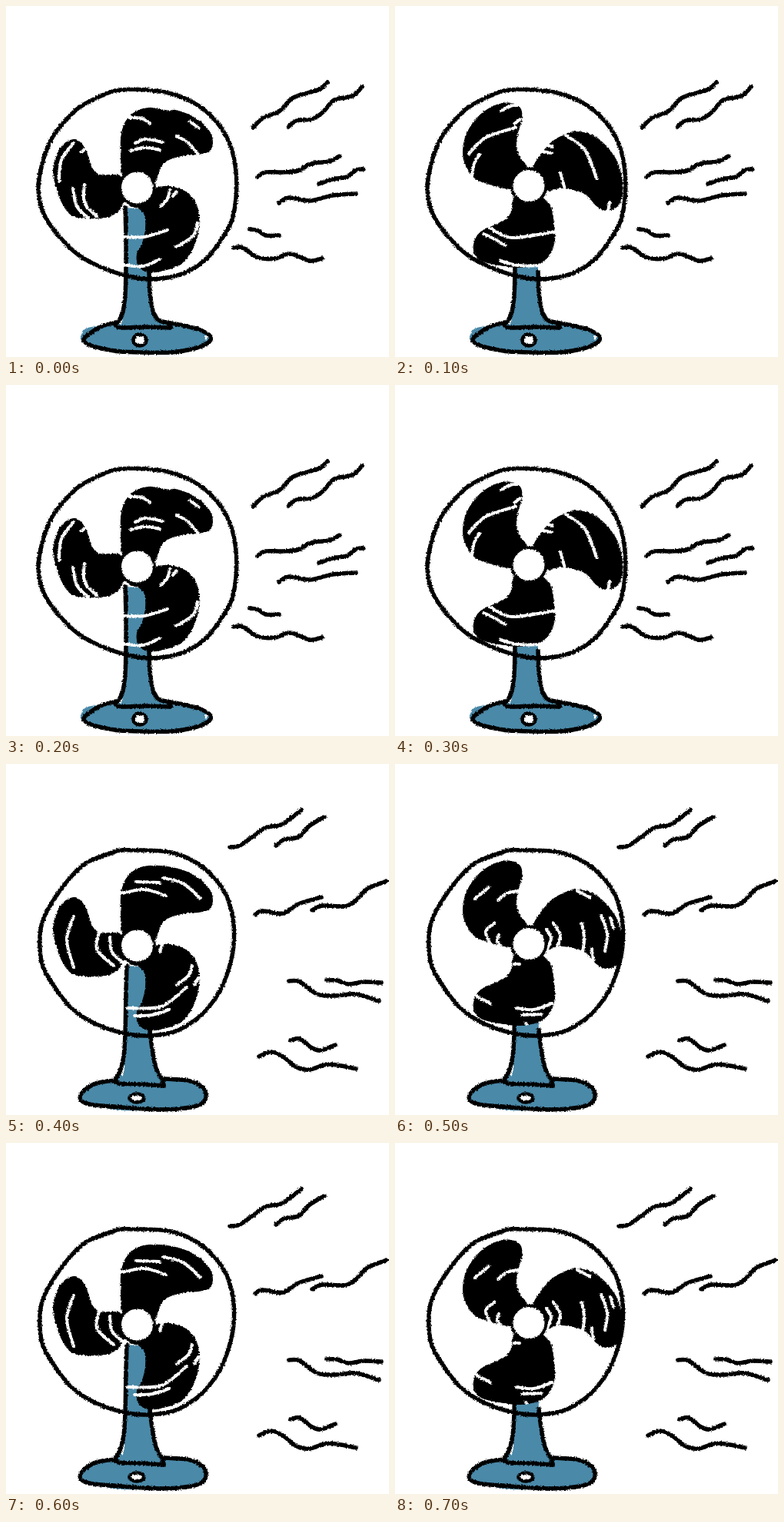
These frames come from a looping animation (498 by 456 pixels, 800 ms). An HTML page:

```html
<!DOCTYPE html>
<html lang="en">
<head>
<meta charset="utf-8">
<title>Desk fan</title>
<style>
  html, body { margin: 0; width: 100%; height: 100%; overflow: hidden; background: #fff; }
  svg { display: block; width: 100vw; height: 100vh; }
</style>
</head>
<body>
<svg id="stage" viewBox="0 0 498 456" xmlns="http://www.w3.org/2000/svg">
  <filter id="rough" filterUnits="userSpaceOnUse" x="0" y="0" width="498" height="456" color-interpolation-filters="sRGB">
    <feTurbulence type="fractalNoise" baseFrequency="0.45" numOctaves="2" seed="4" result="n"/>
    <feDisplacementMap in="SourceGraphic" in2="n" scale="3.5" xChannelSelector="R" yChannelSelector="G"/>
  </filter>
  <g id="art" filter="url(#rough)" stroke-linecap="round" stroke-linejoin="round"></g>
</svg>
<script>
const BLUE = '#4a89a8';
const STEP = 100, STEPS = 8;

// Two drawings of the stand, cage and breeze
const bodies = [
  {
    column: '155,262 156,300 156,340 155,375 152,397 147,409 142,414 150,418 180,418 214,418 211,412 198,408 191,396 187,370 186,345 184,264',
    left: '155,262 156,300 156,340 155,375 152,397 147,409 142,414 150,418 180,417 214,418',
    right: '186,345 187,370 191,396 198,408 211,412 214,418',
    baseFill: '97,430 104,419 125,415 143,411 180,414 214,412 240,417 260,424 264,431 258,440 240,446 215,450 180,451 150,450 120,445 102,438',
    base: '143,411 125,416 108,426 101,434 108,440 125,445 150,449 180,450 215,450 245,445 262,438 266,430 255,422 235,416 214,412',
    knob: [174, 434, 8.5, 7.5],
    specks: ['261,428 260,432', '150,408 149,412'],
    ring: '182,109 215,114 248,128 275,152 292,182 299,215 299,250 293,280 279,305 262,327 240,343 215,352 185,355 155,350 125,340 95,324 68,298 49,270 42,238 47,205 58,175 72,155 95,132 130,114 150,109',
    wind: [
      '321,158 335,145 355,137 372,120 392,113 408,108 418,99',
      '367,157 378,149 398,147 412,138 427,122 450,117 463,105',
      '327,222 337,216 360,216 380,214 397,205 420,202 434,195',
      '407,231 425,225 443,222 455,213 465,212',
      '355,256 368,249 395,253 425,246 455,244',
      '317,290 328,292 338,298 355,298',
      '296,314 308,314 328,327 350,328 370,322 395,331 411,328'
    ]
  },
  {
    column: '157,262 156,300 155,350 152,380 148,400 143,414 175,416 205,418 203,410 195,395 190,370 187,345 184,264',
    left: '157,262 156,300 155,350 153,380 148,400 143,414 175,416 205,418',
    right: '187,345 190,370 195,395 203,410 205,418',
    baseFill: '97,434 103,422 120,414 143,412 175,414 205,410 235,412 252,418 259,428 256,440 240,446 200,449 150,450 115,443',
    base: '143,411 120,414 103,423 96,434 102,440 115,443 150,446 200,449 240,446 256,440 260,428 252,417 235,411 205,409',
    knob: [170, 434, 9.5, 5.5],
    specks: ['153,392 151,403'],
    ring: '175,112 210,114 240,124 265,142 285,168 295,200 296,235 290,265 278,295 258,322 238,338 215,349 180,353 150,349 115,337 85,317 62,288 47,260 44,225 49,200 65,172 85,146 105,128 135,116 150,112',
    wind: [
      '291,108 304,106 320,95 337,83 358,79 372,69 384,60',
      '351,106 362,98 380,95 395,80 414,69',
      '324,196 333,191 360,194 380,182 410,173',
      '398,190 412,184 440,185 455,177 470,162 495,152',
      '368,282 382,283 405,299 430,301 455,299 485,308',
      '417,281 430,281 445,286 465,283 488,284',
      '329,380 345,374 360,380 378,394 395,397 420,390 455,396',
      '370,359 382,357 398,369 410,372 428,365'
    ]
  }
];

// Two blade poses
const rotors = [
  {
    hub: [170.5, 236],
    blades: [
      '170,236 152,222 149,190 150,165 158,146 175,134 200,132 228,137 250,148 265,163 269,178 264,189 250,193 228,195 210,201 201,210 197,222 190,234',
      '165,236 150,221 138,219 122,219 112,210 106,192 98,178 88,173 74,180 65,196 61,215 65,235 72,255 85,272 105,276 130,275 145,268 152,258',
      '172,240 193,236 212,234 232,240 246,254 251,272 250,295 242,318 228,335 205,344 185,346 172,338 170,322 177,308 181,290 180,272 172,263 160,258'
    ]
  },
  {
    hub: [174, 233.5],
    blades: [
      '170,236 150,238 130,234 105,225 92,208 88,190 92,168 104,148 120,134 140,126 155,127 164,134 165,148 160,165 158,182 163,197 172,210',
      '176,230 180,208 190,192 203,177 220,167 236,163 258,168 275,182 288,200 295,222 296,245 290,260 275,266 262,260 250,247 236,240 215,237 197,240',
      '172,236 154,250 152,265 145,276 130,284 113,292 104,303 102,318 110,330 130,336 160,340 185,336 200,325 208,305 207,285 205,270 200,256'
    ]
  }
];

// White glints, by body then rotor
const glints = [
  [
    ['160,145 176,146 187,152', '162,188 180,184 200,187', '168,178 182,173 204,177', '239,150 250,158',
     '222,169 237,178 249,192', '195,131 214,134', '88,178 72,200 69,228', '98,190 106,183', '87,237 92,260 107,276',
     '102,232 101,250 106,263', '109,265 118,273', '201,261 210,250 213,239', '217,247 222,241',
     '249,282 243,299 221,313', '153,300 180,300 210,291', '152,336 178,338 200,329'],
    ['138,136 150,130 162,129', '96,192 118,171 157,158', '110,193 103,205 100,221', '155,153 163,147',
     '187,188 203,191', '194,180 205,183', '222,168 247,187 262,224', '215,217 221,238', '277,266 279,255',
     '123,288 152,301 208,293', '115,296 128,302 143,311', '137,331 160,337 190,337']
  ],
  [
    ['169,153 200,154', '150,168 180,163 208,171', '204,148 230,155 252,174', '88,198 79,228 88,264',
     '123,213 118,240 140,262', '135,225 138,245 155,260', '204,232 200,244', '242,262 237,275 222,287',
     '250,278 245,287', '158,317 202,315 235,290', '167,327 190,326 212,319'],
    ['104,175 122,160', '134,177 145,168 160,165', '130,207 118,217 124,234', '135,222 133,230 138,238',
     '237,165 253,173', '243,207 246,228 243,250', '268,197 276,220 273,243', '280,200 284,213', '256,240 258,255',
     '197,215 203,226 198,240', '206,207 215,222 211,237', '103,300 124,311', '158,317 180,319 204,311',
     '165,326 190,325', '155,260 162,260', '170,337 171,338']
  ]
];

const art = document.getElementById('art');

function add(parent, tag, attrs = {}) {
  const el = document.createElementNS('http://www.w3.org/2000/svg', tag);
  for (const k in attrs) el.setAttribute(k, attrs[k]);
  parent.appendChild(el);
  return el;
}

// Smooth curve through the given points
function curve(text, closed) {
  const p = text.split(' ').map(s => s.split(',').map(Number));
  const n = p.length;
  const at = i => closed ? p[(i + n) % n] : p[Math.max(0, Math.min(n - 1, i))];
  let d = 'M' + p[0];
  for (let i = 0; i < (closed ? n : n - 1); i++) {
    const [a, b, c, e] = [at(i - 1), at(i), at(i + 1), at(i + 2)];
    const c1 = b.map((v, k) => v + (c[k] - a[k]) / 6);
    const c2 = c.map((v, k) => v - (e[k] - b[k]) / 6);
    d += `C${c1} ${c2} ${c}`;
  }
  return closed ? d + 'Z' : d;
}

const line = (g, pts, width, color = '#000', closed = false) =>
  add(g, 'path', { d: curve(pts, closed), fill: 'none', stroke: color, 'stroke-width': width });
const blob = (g, pts, color) => add(g, 'path', { d: curve(pts, true), fill: color });

function drawBody(b) {
  const g = add(art, 'g');
  blob(g, b.baseFill, BLUE);
  add(g, 'polygon', { points: b.column, fill: BLUE });
  b.specks.forEach(s => line(g, s, 3, '#fff'));
  line(g, b.base, 5.5);
  line(g, b.left, 5.5);
  line(g, b.right, 5.5);
  const [cx, cy, rx, ry] = b.knob;
  add(g, 'ellipse', { cx, cy, rx, ry, fill: '#fff', stroke: '#000', 'stroke-width': 4.5 });
  line(g, b.ring, 5.5, '#000', true);
  b.wind.forEach(w => line(g, w, 5.5));
  return g;
}

function drawRotor(r) {
  const g = add(art, 'g');
  r.blades.forEach(s => blob(g, s, '#000'));
  return g;
}

function drawGlints(list, hub) {
  const g = add(art, 'g');
  list.forEach(s => line(g, s, 4, '#fff'));
  add(g, 'circle', { cx: hub[0], cy: hub[1], r: 22.5, fill: '#fff', stroke: '#000', 'stroke-width': 4 });
  return g;
}

const bodyEls = bodies.map(drawBody);
const rotorEls = rotors.map(drawRotor);
const glintEls = glints.map(set => set.map((list, i) => drawGlints(list, rotors[i].hub)));

const show = (el, on) => el.setAttribute('display', on ? 'inline' : 'none');
let last = -1;

function render(t) {
  const step = Math.floor(t / STEP) % STEPS;
  if (step === last) return;
  last = step;
  const body = step < STEPS / 2 ? 0 : 1;
  const pose = step % 2;
  bodyEls.forEach((el, i) => show(el, i === body));
  rotorEls.forEach((el, i) => show(el, i === pose));
  glintEls.forEach((set, i) => set.forEach((el, j) => show(el, i === body && j === pose)));
}

let start = null;
function tick(now) {
  if (start === null) start = now;
  render(Math.max(0, now - start));
  requestAnimationFrame(tick);
}
render(0);
requestAnimationFrame(tick);
</script>
</body>
</html>
```
